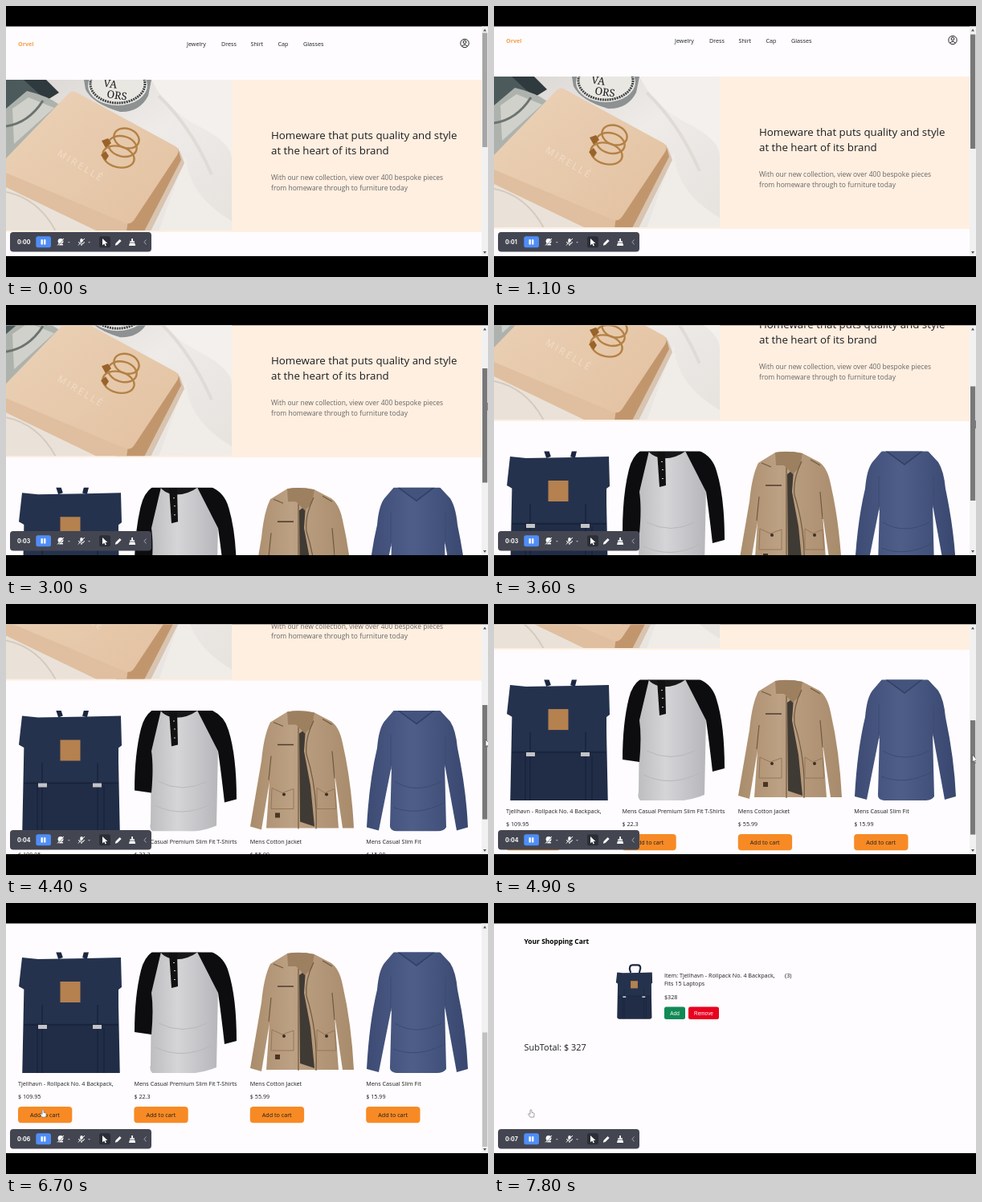
Animation of 600 by 338 pixels, one loop 8 s. Source, as an HTML page:

```html
<!DOCTYPE html>
<html lang="en">
<head>
<meta charset="utf-8">
<title>Shop demo</title>
<style>
html, body { margin: 0; width: 100%; height: 100%; overflow: hidden; background: #000; }
svg { display: block; width: 100vw; height: 100vh; font: 7.2px "Open Sans", "Noto Sans", sans-serif; }
text { fill: #1d1d1f; white-space: pre; }
</style>
</head>
<body>
<svg viewBox="0 0 600 338">
  <defs>
    <clipPath id="view"><rect y="25.4" width="600" height="286.6"/></clipPath>
    <clipPath id="photo"><rect y="92" width="281" height="188"/></clipPath>
    <clipPath id="crop"><rect y="61.5" width="592" height="150.5"/></clipPath>
    <linearGradient id="cloth" x2="1" y2="1">
      <stop offset="0" stop-color="#d9d5d2"/><stop offset=".5" stop-color="#eeebe8"/><stop offset="1" stop-color="#e6e2de"/>
    </linearGradient>
    <linearGradient id="lid" x2="1" y2="1">
      <stop offset="0" stop-color="#ecd2b8"/><stop offset="1" stop-color="#e2c1a0"/>
    </linearGradient>
    <linearGradient id="grey"><stop offset="0" stop-color="#bdbdc0"/><stop offset=".4" stop-color="#d5d5d8"/><stop offset="1" stop-color="#b7b7bb"/></linearGradient>
    <linearGradient id="tan"><stop offset="0" stop-color="#a98c6b"/><stop offset=".4" stop-color="#bda184"/><stop offset="1" stop-color="#a88b6b"/></linearGradient>
    <linearGradient id="blue"><stop offset="0" stop-color="#3d4b74"/><stop offset=".45" stop-color="#4e5e89"/><stop offset="1" stop-color="#39476f"/></linearGradient>

    <g id="pack">
      <path d="M-12-68L-16-80Q-16-95-6-95H12Q22-95 22-84L18-68" fill="none" stroke="#1b2741" stroke-width="6"/>
      <path d="M-57-60H59L62 88Q62 95 54 95H-53Q-60 95-60 88Z" fill="#212d47"/>
      <path d="M-60-69L-40-67L20-68L63-69L64-32L60-29V13H-57V-29L-64-33Z" fill="#25324d"/>
      <path d="M-58 15H60M-41 18V94M42 18V94M-35-10V94M34-10V94" fill="none" stroke="#17213a" stroke-width="1.3"/>
      <path d="M-40 15h11v5h-11zM28 15h11v5h-11z" fill="#c3c4c6"/>
      <rect x="-12.5" y="-39" width="25" height="26" fill="#b5814f"/>
    </g>
  </defs>

  <g clip-path="url(#view)">
    <rect y="25" width="600" height="288" fill="#fefcfe"/>

    <g id="shop">
      <text x="15" y="50.3" font-weight="700" style="fill:#f6a04b">Orvel</text>
      <g id="nav"></g>
      <g fill="none" stroke="#222" stroke-width="1">
        <circle cx="571" cy="46.5" r="5.2"/><circle cx="571" cy="45" r="1.9"/>
        <path d="M567.5 50.2Q571 46.6 574.5 50.2"/>
      </g>

      <rect y="92" width="592" height="190" fill="#ffefe0"/>
      <g clip-path="url(#photo)">
        <rect y="92" width="281" height="188" fill="url(#cloth)"/>
        <path d="M181 92Q200 130 240 150T281 190V92Z" fill="#f3f0ed"/>
        <path d="M224 186Q226 236 281 268V281H190Z" fill="#f0ece8"/>
        <path d="M190 112Q230 150 256 210" fill="none" stroke="#e0dbd6" stroke-width="4"/>
        <path d="M0 200L150 272L140 281H0Z" fill="#eae2d9"/>
        <path d="M0 232Q40 240 62 281" fill="none" stroke="#d5cabe" stroke-width="2"/>
        <!-- bottles -->
        <path d="M0 92H46L40 118L0 134Z" fill="#4d5a5c"/>
        <path d="M22 92L50 118L66 108L50 92Z" fill="#2f3a3e"/>
        <path d="M0 128L26 106Q52 112 68 124L58 140L0 192Z" fill="#aeb2ad"/>
        <path d="M8 128L28 114L60 127L10 172Z" fill="#cfd1ca"/>
        <path d="M0 150Q28 146 46 118" fill="none" stroke="#6c7470" stroke-width="3"/>
        <path d="M97 92H181L177 112Q166 133 142 132Q108 122 99 104Z" fill="#8d9192"/>
        <ellipse cx="139" cy="99" rx="37" ry="25" fill="#e9e7e2"/>
        <ellipse cx="139" cy="97" rx="34" ry="24" fill="none" stroke="#3d4143" stroke-width="3" stroke-dasharray="2 1"/>
        <g font-family="Noto Serif, serif" font-size="13" transform="rotate(8 140 100)">
          <text x="121" y="103">VA</text><text x="127" y="116">ORS</text>
        </g>
        <!-- gift box -->
        <path d="M216 180L222 196L180 281H150Z" fill="#d8c4b0"/>
        <path d="M214 177L218 192L172 281H136L148 264Z" fill="#c2966d"/>
        <path d="M0 206L152 267L150 281L114 281L0 226Z" fill="#dfbf9f"/>
        <path d="M78 109Q83 104 90 109L211 175Q217 179 213 186L160 266Q155 274 147 270L0 208V190Z" fill="url(#lid)"/>
        <text transform="translate(63 186) rotate(31)" font-size="12" letter-spacing="2.6" style="fill:#f1ddc8">MIRELLÉ</text>
        <g fill="none" stroke="#b48145" stroke-width="2.4">
          <ellipse cx="150" cy="165" rx="16" ry="12" transform="rotate(20 150 165)"/>
          <ellipse cx="145" cy="175" rx="18" ry="12.5" transform="rotate(15 145 175)"/>
          <ellipse cx="140" cy="188" rx="20" ry="13" transform="rotate(15 140 188)"/>
        </g>
        <path d="M119 168l8-3 4 6-7 6zM118 186l6-5 4 6-4 6z" fill="#99632b"/>
      </g>
      <g font-size="13.3">
        <text x="330" y="165.8">Homeware that puts quality and style</text>
        <text x="330" y="185">at the heart of its brand</text>
      </g>
      <g font-size="8.5">
        <text x="330" y="217" style="fill:#666">With our new collection, view over 400 bespoke pieces</text>
        <text x="330" y="229.6" style="fill:#666">from homeware through to furniture today</text>
      </g>

      <g transform="translate(0 258)">
        <g clip-path="url(#crop)">
          <use href="#pack" x="80" y="137"/>
          <!-- raglan shirt -->
          <path d="M192 61H242L264 108L262 205Q240 214 222 212H182Q178 208 180 202L181 108Z" fill="url(#grey)"/>
          <path d="M193 61H182Q172 68 168 84Q160 116 160 161L181 164Q184 132 181 112Z" fill="#0d0d10"/>
          <path d="M238 61H256Q272 68 277 86Q287 118 287 172L272 176Q268 140 264 112Z" fill="#0d0d10"/>
          <path d="M192 61H239Q224 72 207 70Q196 67 192 61Z" fill="#17171a"/>
          <path d="M203 62H213L214 104L206 106Z" fill="#111"/>
          <path d="M209 74v1M210 84v1M210 95v1" stroke="#ccc" stroke-width="2"/>
          <path d="M190 150Q220 165 250 150M186 180Q220 196 255 178" fill="none" stroke="#b8b8bc"/>
          <!-- jacket -->
          <path d="M350 63L329 76Q321 92 318 124L304 206L318 210L328 150L324 208H414L409 140L419 208H433Q430 150 419 102Q415 82 405 75L384 64Q366 60 350 63Z" fill="url(#tan)"/>
          <path d="M365 90L373 84L371 112L379 155L384 206L366 200Z" fill="#403a34"/>
          <path d="M350 63Q366 60 384 64L381 81L372 90L361 79L351 79Z" fill="#9d8060"/>
          <path d="M383 74Q372 96 374 116Q388 160 386 209M364 82V209M327 148L330 118M409 146L406 112M333 76L345 81M394 72L406 79" fill="none" stroke="#6f5940" stroke-width="1.2"/>
          <path d="M338 104H358" stroke="#4c3d2f" stroke-width="1.6"/>
          <path d="M331 158l13 6 14-5v25h-28zM387 158l10 6 12-5 2 25h-24z" fill="none" stroke="#937859"/>
          <circle cx="346" cy="166" r="2" fill="#3b2f25"/><circle cx="399" cy="166" r="2" fill="#3b2f25"/>
          <rect x="335" y="189" width="6" height="6" fill="#4a3523"/>
          <!-- blue top -->
          <path d="M483 61H540L553 75Q560 86 562 108Q573 160 575 207L561 211L546 128L548 207Q545 212 536 212H486Q477 211 478 204L480 130L464 211L449 207Q452 150 462 108Q464 84 471 75Z" fill="url(#blue)"/>
          <path d="M489 61H531L511 77Z" fill="#44537c"/>
          <path d="M488 61L511 78L533 61" fill="none" stroke="#323f65" stroke-width="1.6"/>
          <path d="M479 92V135M547 92V132M484 150Q510 166 542 150M482 182Q512 194 546 176" fill="none" stroke="#3b4a72"/>
        </g>
        <g id="cards"></g>
      </g>
    </g>

    <g id="bar">
      <rect x="592" y="25" width="8" height="287" fill="#f1f1f1"/>
      <path d="M594 31.5l2-3 2 3zM594 306l2 3 2-3z" fill="#555"/>
      <rect id="thumb" x="593" width="6.2" height="142.5"/>
    </g>

    <g id="cart">
      <text x="37.5" y="51" font-size="8.45" font-weight="700" style="fill:#000">Your Shopping Cart</text>
      <use href="#pack" transform="translate(174.5 111) scale(.354)"/>
      <text x="212" y="92.8">Item: Tjellhavn - Rollpack No. 4 Backpack,</text>
      <text x="362" y="92.8">(3)</text>
      <text x="212" y="103">Fits 15 Laptops</text>
      <text x="212" y="120.4">$328</text>
      <rect x="212" y="129.5" width="26" height="15.5" rx="2.5" fill="#128a55"/>
      <rect x="242" y="129.5" width="38" height="15.5" rx="2.5" fill="#e8001f"/>
      <g font-family="Liberation Sans, sans-serif" font-size="6.4" text-anchor="middle">
        <text x="225" y="139.6" style="fill:#fff">Add</text>
        <text x="261" y="139.6" style="fill:#fff">Remove</text>
      </g>
      <text x="37.5" y="183.6" font-size="10.9">SubTotal: $ 327</text>
    </g>

    <!-- recorder toolbar -->
    <rect x="5" y="282" width="176" height="24.5" rx="4" fill="#434651"/>
    <text id="clock" x="14" y="297" font-family="Inter, sans-serif" font-size="7" font-weight="700" style="fill:#fff"></text>
    <rect x="37.3" y="287.3" width="18.7" height="14" rx="2.5" fill="#4f8df7"/>
    <path d="M43.5 291.2h2.4v6.4h-2.4zM47 291.2h2.4v6.4H47z" fill="#fff"/>
    <rect x="116" y="287.3" width="14" height="14" rx="2.5" fill="#2c2e37"/>
    <g fill="#fff">
      <circle cx="68" cy="293.3" r="3.4"/><path d="M65 297h6v1.4h-6z"/>
      <rect x="92.3" y="290" width="3.4" height="5.5" rx="1.7"/>
      <path d="M120 290v8.6l2.2-2 1.4 2.9 1.4-.7-1.4-2.8h2.8z"/>
      <path d="M135.8 298.8l.7-2.8 5-5 2.1 2.1-5 5z"/>
      <path d="M156.2 290h1.8v3.2h2v1.6h-5.8v-1.6h2zM154 295.5h6.2l1 3.4h-8.2z"/>
      <path d="M76.8 294h3l-1.5 1.8zM102 294h3l-1.5 1.8z" fill="#a5a8b1"/>
    </g>
    <g fill="none" stroke="#fff">
      <path d="M90.5 294q.3 3 3.5 3t3.5-3M94 297v2M64 298.5l8-8.5M90 298.5l8-8.5"/>
      <path d="M64.7 299l8-8.5M90.7 299l8-8.5" stroke="#434651" stroke-width=".7"/>
      <path d="M174.5 291.5l-2.5 3 2.5 3" stroke="#a5a8b1"/>
    </g>

    <path id="arrow" d="M0 0V9.2L2.1 7.3L3.5 10.3L5 9.6L3.6 6.8H6.4Z" fill="#fff" stroke="#333" stroke-width=".6"/>
    <path id="hand" d="M-1 1Q0-.8 1 1V4Q4 3.8 4.2 5.5L3.6 9.6H-1L-3.4 6Q-3.4 4.4-1 6Z" fill="#fff" stroke="#777" stroke-width=".7"/>
  </g>
</svg>
<script>
const el = id => document.getElementById(id);
const move = (id, x, y) => el(id).setAttribute('transform', `translate(${x} ${y})`);
const show = (id, on) => el(id).style.display = on ? '' : 'none';

el('nav').innerHTML = [['Jewelry', 225], ['Dress', 268], ['Shirt', 304.5], ['Cap', 338.5], ['Glasses', 370]]
  .map(([s, x]) => `<text x="${x}" y="50.3">${s}</text>`).join('');

el('cards').innerHTML = [
  ['Tjellhavn - Rollpack No. 4 Backpack,', '109.95'],
  ['Mens Casual Premium Slim Fit T-Shirts', '22.3'],
  ['Mens Cotton Jacket', '55.99'],
  ['Mens Casual Slim Fit', '15.99']
].map(([name, price], i) => `<g transform="translate(${15 + i * 144.4} 0)">
  <text y="227.8">${name}</text><text y="243.8">$ ${price}</text>
  <rect y="254" width="67.3" height="20.3" rx="4" fill="#f78a25"/>
  <text x="15" y="266.8">Add to cart</text></g>`).join('');

// linear interpolation through [time, value] points
function track(points, t) {
  const i = points.findIndex(p => p[0] > t);
  if (i < 0) return points[points.length - 1][1];
  if (!i) return points[0][1];
  const [[t0, a], [t1, b]] = [points[i - 1], points[i]];
  return a + (b - a) * (t - t0) / (t1 - t0);
}

const scrollPath = [[600, 0], [1100, 4], [1600, 16], [2400, 46.5], [3600, 137], [4400, 186.5], [5200, 248], [5400, 258]];
const dragX = [[2400, 600], [3600, 599.5], [4400, 597], [5400, 594]];

function draw(now) {
  const t = Math.floor(now / 100) * 100 % 8000;
  const scroll = track(scrollPath, t), inCart = t >= 7500;
  const top = 33.5 + scroll * .496;
  const p = Math.min(1, Math.max(0, (t - 5600) / 800)), ease = p * p * (3 - 2 * p);
  const x = track(dragX, t), y = top + 43;

  move('shop', 0, -scroll);
  el('thumb').setAttribute('y', top);
  el('thumb').setAttribute('fill', t < 700 ? '#a6a6a6' : t < 5700 ? '#787878' : '#c1c1c1');
  el('clock').textContent = '0:0' + Math.floor(t / 1000);
  show('shop', !inCart);
  show('bar', !inCart);
  show('cart', inCart);

  show('arrow', t >= 2500 && p < 1);
  show('hand', p === 1);
  move('arrow', x + (46 - x) * ease, y + (257.5 - y) * ease);
  move('hand', 46, 257.5);
}

let start;
function loop(now) {
  start ??= now;
  draw(now - start);
  requestAnimationFrame(loop);
}
draw(0);
requestAnimationFrame(loop);
</script>
</body>
</html>
```
